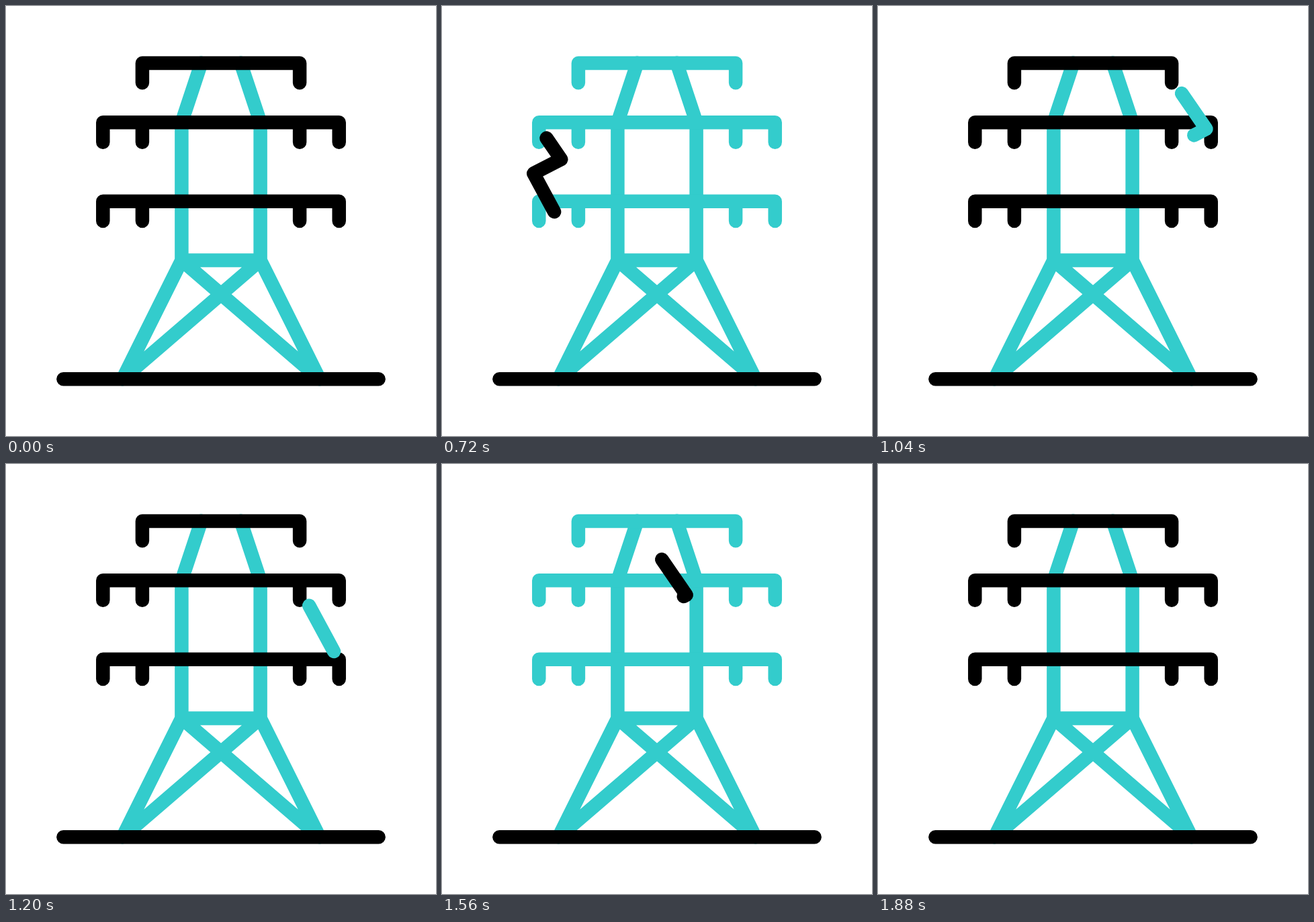
Recreate the animation shown at these times as an HTML page. Size 640 by 640 pixels, loop 2.4 s.

```html
<!DOCTYPE html>
<html lang="en">
<head>
<meta charset="utf-8">
<title>Power line tower</title>
<style>
  html, body { margin: 0; width: 100%; height: 100%; overflow: hidden; background: #fff; }
  svg { display: block; width: 100%; height: 100%; }
  path { fill: none; stroke-width: 20.5; stroke-linecap: round; stroke-linejoin: round; }
</style>
</head>
<body>
<svg viewBox="0 0 640 640">
  <path stroke="#3cc" d="M290.7 84.9 261.4 173.3V378.6L173.5 555 378.6 378.6
    M349.3 84.9 378.6 173.3V378.6L466.5 555 261.4 378.6H378.6"/>
  <path id="arms" d="M202.9 114.2V84.9H437.1V114.2
    M144.3 202.8V173.3H495.7V202.8M202.9 173.3V202.8M437.1 173.3V202.8
    M144.3 320V290.7H495.7V320M202.9 290.7V320M437.1 290.7V320"/>
  <path stroke="#000" d="M85.4 555.2H554.6"/>
  <path id="bolt" d="M0 0 36.5 53 -4.5 74 36 149"/>
</svg>
<script>
const LOOP = 2400, STEP = 20, FPS = 30;
const TEAL = '#3cc', BLACK = '#000';
const GROW = 7, TAIL_DELAY = 4, LIFE = 11;  // in ticks of 1/30 s

const strikes = [
  { start: 16, x: 140.8, y: 175.2, color: BLACK },
  { start: 28.01, x: 452, y: 130, color: TEAL },
  { start: 44, x: 327.2, y: 142, color: BLACK }
];

const arms = document.getElementById('arms');
const bolt = document.getElementById('bolt');
const boltLength = bolt.getTotalLength();

function ease(u) {
  u = Math.min(1, Math.max(0, u));
  return u * u * (3 - 2 * u);
}

function render(ms) {
  const time = Math.floor((ms % LOOP) / STEP) * STEP;
  const tick = time * FPS / 1000;
  const flipped = (tick >= 16 && tick < 28) || (tick >= 44 && tick < 56);
  arms.setAttribute('stroke', flipped ? TEAL : BLACK);

  const strike = strikes.find(s => tick >= s.start && tick < s.start + LIFE - 1e-6);
  bolt.style.display = strike ? '' : 'none';
  if (!strike) return;

  const age = tick - strike.start;
  const head = ease(age / GROW) * boltLength;
  const tail = ease((age - TAIL_DELAY) / GROW) * boltLength;
  bolt.setAttribute('transform', `translate(${strike.x} ${strike.y})`);
  bolt.setAttribute('stroke', strike.color);
  bolt.setAttribute('stroke-dasharray', `${Math.max(0.01, head - tail)} 1000`);
  bolt.setAttribute('stroke-dashoffset', -tail);
}

const began = performance.now();
function frame() {
  render(performance.now() - began);
  requestAnimationFrame(frame);
}
frame();
</script>
</body>
</html>
```
